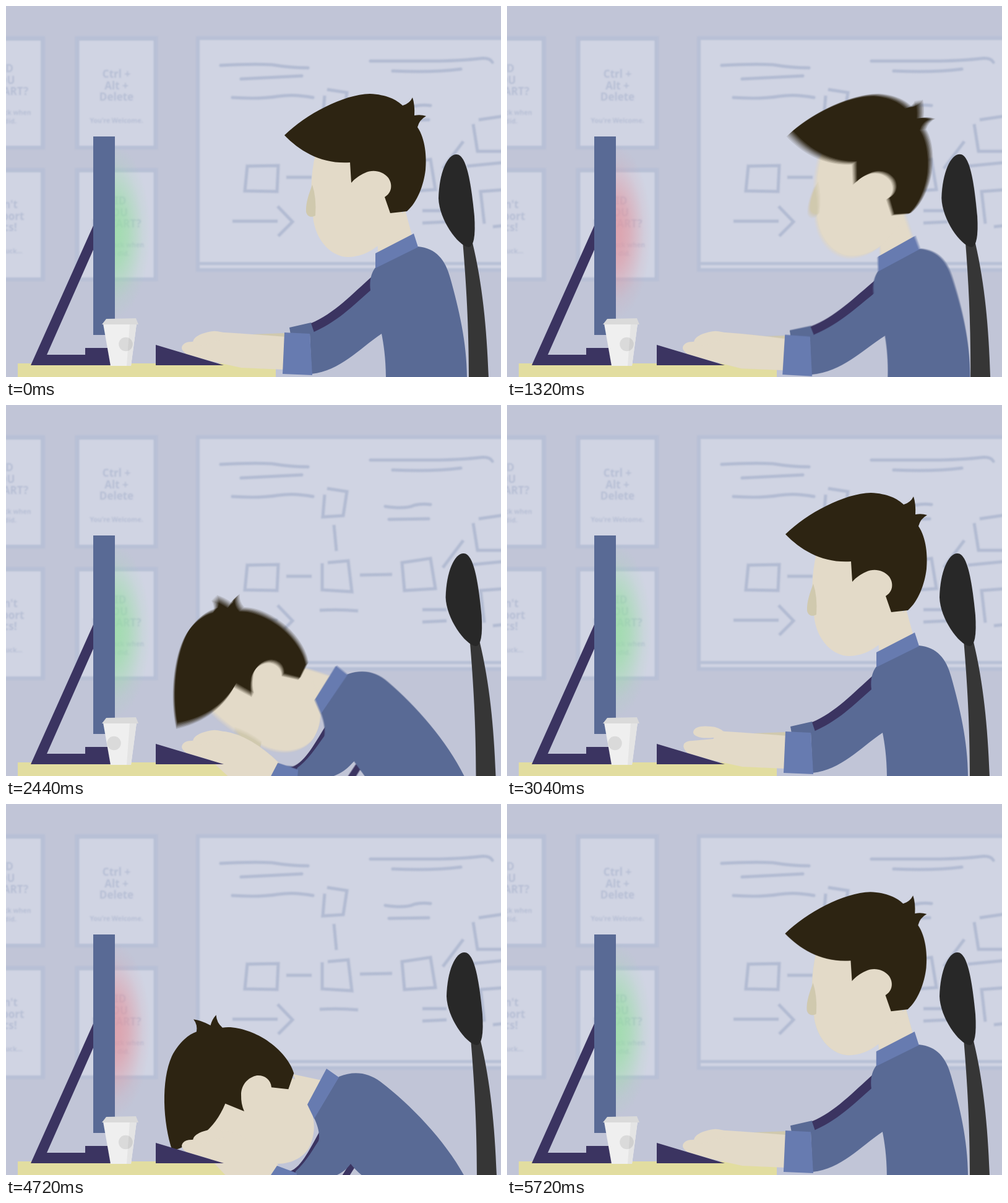
Animation of 800 by 600 pixels, one loop 5760 ms. Source, as an HTML page with a canvas:

```html
<!DOCTYPE html>
<html lang="en">
<head>
<meta charset="utf-8">
<title>Desk slam</title>
<style>
html, body { margin: 0; width: 100%; height: 100%; overflow: hidden; background: #c1c5d7; }
canvas { display: block; }
</style>
</head>
<body>
<canvas id="stage" width="800" height="600"></canvas>
<script>
const LOOP = 5760, HALF = 2880, STEP = 40, SHUTTER = 18, SAMPLES = 8;
const LEAN = 960, SLAM = 1220, HIT = 1470, WAKE = 2250;
const SHIRT = '#596a95', TRIM = '#677bb0', DARK = '#3b3461', SKIN = '#e3dac8', SHADE = '#d0c9ae';

const stage = document.getElementById('stage').getContext('2d');
const layer = () => {
  const c = document.createElement('canvas');
  c.width = 800;
  c.height = 600;
  return c.getContext('2d');
};
const wall = layer(), scene = layer();

const clamp = v => Math.min(1, Math.max(0, v));
const ramp = (t, a, b) => clamp((t - a) / (b - a));
const mix = (a, b, k) => a + (b - a) * k;
const inOut = u => u < .5 ? 4 * u ** 3 : 1 - 4 * (1 - u) ** 3;

function fill(color, path) {
  scene.fillStyle = color;
  scene.fill(new Path2D(path));
}

function drawWall(g) {
  const frame = '#b8c0d6', paper = '#d0d4e3';
  const box = (color, x, y, w, h) => { g.fillStyle = color; g.fillRect(x, y, w, h); };
  box('#c1c5d7', 0, 0, 800, 600);
  g.filter = 'blur(1px)';

  const poster = (x, y, big, bigY, small, smallY) => {
    box(frame, x - 67, y, 134, 183);
    box(paper, x - 60, y + 7, 120, 170);
    g.fillStyle = '#b7bfd5';
    g.textAlign = 'center';
    g.font = '800 17px "Noto Sans", sans-serif';
    big.forEach((s, i) => g.fillText(s, x, bigY + i * 18.6));
    g.font = '800 10.5px "Noto Sans", sans-serif';
    small.forEach((s, i) => g.fillText(s, x, smallY + i * 14));
  };
  const restart = ['DID', 'YOU', 'RESTART?'], back = ['Come back when', 'you did.'];
  poster(-4, 49, restart, 107, back, 176);
  poster(178.5, 49, ['Ctrl +', 'Alt +', 'Delete'], 116, ["You're Welcome."], 189);
  poster(-4, 262, ["Don't", 'support', 'docs!'], 327, ['Good luck...'], 400);
  poster(178.5, 262, restart, 321, back, 390);

  box(frame, 307, 49, 510, 381);
  box(paper, 313, 55, 510, 359);
  box(paper, 313, 419, 510, 5);
  g.strokeStyle = '#b2bbd2';
  g.lineWidth = 5;
  g.lineCap = 'round';
  g.stroke(new Path2D(`M347,96Q400,93 430,95Q460,100 488,100M380,118L478,113
    M366,148Q410,151 440,146Q465,142 496,148M589,89L700,89Q740,88 765,85Q782,83 786,91
    M625,105Q690,108 735,102M613,164Q645,169 660,162Q672,159 686,161M619,185L683,184`));
  g.lineCap = 'butt';
  g.stroke(new Path2D(`M519,135L551,140L545,179L512,181L515,145M530,194L534,236
    M390,259L440,258L438,300L386,299ZM453,277L494,277M520,255L553,252L559,302L511,299L511,256
    M572,275L624,274M640,255L686,248L694,297L644,300ZM739,219L706,263
    M764,184L805,178M755,191L762,235L805,235M745,259L805,253M805,297L767,300L773,352M787,357L805,355
    M673,331L712,331M673,351L712,349M507,332Q540,330 569,333M366,348L439,348M439,324L463,349L440,372`));
  g.filter = 'none';
}

// Time inside one slam; the second one runs slightly late.
const phaseAt = t => (t < HALF ? t : t - 10 + HALF) % HALF;

function poseAt(p) {
  const lean = p < HIT ? inOut(ramp(p, LEAN, SLAM)) : 0;
  const down = p < HIT ? ramp(p, SLAM, HIT) ** 3 : 1 - inOut(ramp(p, WAKE, HALF));
  return { lean, down };
}

// Blends two paths of equal structure: sitting up (with a lean back) and lying on the desk.
function morph(up, lying, { lean, down }) {
  const from = up.match(/\d+/g).map(Number), to = lying.match(/\d+/g).map(Number);
  let i = 0;
  return up.replace(/\d+/g, () => {
    const even = i % 2 === 0, x = from[i], y = from[i + 1];
    const shift = even ? lean * 10 * clamp((x - 495) / 100) * clamp((680 - y) / 200) : 0;
    const v = mix(from[i] + shift, to[i], down);
    i++;
    return v.toFixed(2);
  });
}

function drawGlow(p) {
  const rgb = p >= 880 && p < 2280 ? '224,150,160' : '150,222,162';
  scene.save();
  scene.beginPath();
  scene.rect(176, 200, 100, 330);
  scene.clip();
  scene.translate(172, 365);
  scene.scale(62, 142);
  const g = scene.createRadialGradient(0, 0, 0, 0, 0, 1);
  [.78, .74, .6, .36, .12, 0].forEach((a, i) => g.addColorStop(i / 5, `rgba(${rgb},${a})`));
  scene.fillStyle = g;
  scene.fillRect(-1, -1, 2, 2);
  scene.restore();
}

function drawChair({ lean, down }) {
  scene.save();
  scene.translate(765 + 13 * down, 640);
  scene.rotate(.008 * lean * (1 - down));
  scene.translate(-765, -640);
  fill('#363636', 'M738,380L754,383C770,450 777,520 780,602L748,602C748,520 744,450 738,380Z');
  fill('#282828', 'M728,240C745,240 752,290 757,340Q760,388 748,390C730,388 700,345 699,311C700,270 713,240 728,240Z');
  scene.restore();
}

function drawHead({ lean, down }) {
  const arc = down * (1 - down);
  scene.save();
  scene.translate(mix(558 + 20 * lean, 385, down) - 50 * arc, mix(286 - 11 * lean, 497, down) - 45 * arc);
  scene.rotate(mix(6.5 * lean, -64.5, down) * Math.PI / 180);
  scene.translate(-558, -286);
  fill(SKIN, 'M500,240C492,275 492,305 496,340C500,382 528,406 553,406C580,405 594,393 606,384L640,340L640,240Z');
  fill(SHADE, 'M495,289C490,303 484,318 485,333C487,342 495,342 500,339Q502,310 495,289Z');
  fill('#2d2412', `M450,209C485,175 545,143 588,142C615,143 632,152 641,161Q652,158 657,148
    Q661,160 660,177Q670,175 679,178Q668,184 665,196C678,215 680,245 678,265C675,290 665,317 648,332
    L621,335L612,309C624,302 625,288 618,278C608,266 592,264 580,270C571,274 564,279 558,286L556,253
    C510,256 475,235 450,209Z`);
  scene.restore();
}

function drawHand(pose, p) {
  const raised = p < 840 ? (1 - Math.cos(p / 280 * 2 * Math.PI)) / 2 : 0;
  const tip = 284 + 3 * raised;
  fill(SKIN, morph(
    'M292,563Q280,555 286,548Q290,543 300,543L333,540L345,527Q352,528 354,528Q400,531 452,535L448,588L380,585L330,574Z',
    'M292,563Q280,555 286,548Q290,543 300,543L333,540L345,527Q352,528 354,528Q395,535 440,584L426,606L360,606L330,574Z',
    pose).replace('280.00', (tip - 4).toFixed(2)));
  scene.save();
  scene.translate(348, 533);
  scene.rotate(-(1 - raised) * .36);
  scene.translate(-348, -533);
  fill(SKIN, 'M350,541Q340,538 333,538C315,540 301,536 301,529C302,520 315,518 330,520Q342,521 350,528Z');
  scene.restore();
}

function drawPerson(pose, p) {
  const part = (color, up, lying) => fill(color, morph(up, lying, pose));
  part(SHADE, 'M398,531L450,529L455,537L400,537Z', 'M400,590L440,592L440,602L400,602Z');
  part(SHIRT, 'M458,520L493,512L502,531L460,531Z', 'M440,590L465,594L468,602L440,602Z');
  part(DARK, 'M493,513C530,498 560,465 592,437L592,462C560,490 530,515 499,531Z',
    'M455,595C475,592 490,560 506,531L506,545C500,560 485,590 470,602Z');
  part(DARK, 'M645,570L665,550L672,558L656,590Z', 'M540,606L557,579L564,587L552,606Z');
  part(SKIN, 'M600,380L645,330L660,385L602,410Z', 'M490,500L464,437L520,449L492,500Z');
  drawHead(pose);
  part(SHIRT, `M597,423L666,389C695,392 710,410 718,440C732,490 745,545 745,602L614,602
    C614,570 610,545 607,530C570,555 540,590 494,595L491,530C535,512 560,485 589,460C587,445 590,432 597,423Z`,
    `M498,508L538,441C562,431 585,434 605,449C655,487 710,545 741,602L577,602
    C571,597 563,590 557,582C550,590 540,610 466,612L468,594C482,582 492,565 505,545C508,535 504,520 498,508Z`);
  part(TRIM, 'M597,400L659,368L666,390L597,424Z', 'M487,486L518,428L538,442L498,509Z');
  drawHand(pose, p);
  part(TRIM, 'M450,528L491,530L495,597L447,595Z', 'M438,585L470,597L466,625L420,612Z');
}

function drawCup(t, p) {
  const u = ramp(p, HIT, 1740);
  const turned = ramp(t, HIT, 1830) - ramp(t, HIT + HALF + 10, 1830 + HALF + 10);
  scene.save();
  scene.translate(186, 582 - 14 * Math.sin(u * Math.PI));
  scene.rotate(.08 * Math.sin(u * 2 * Math.PI));
  scene.translate(-186, -582);
  fill('#efefef', 'M157,514L211,514L202,582L169,582Z');
  fill('#e4e4e4', 'M200,514L211,514L202,582L195,582Z');
  scene.fillStyle = 'rgba(0,0,0,.085)';
  scene.beginPath();
  scene.arc(193.5 - 19 * turned, 547, 11.3, 0, 7);
  scene.fill();
  fill('#dadada', 'M155,515L162,506L210,505L214,515Z');
  scene.restore();
}

function drawScene(t) {
  const p = phaseAt(t), pose = poseAt(p);
  const since = p - HIT;
  const shake = since > 0 && since < 350 ? -6 * Math.exp(-since / 90) * Math.cos(since / 26) : 0;
  const shaken = draw => {
    scene.save();
    scene.translate(shake, 0);
    draw();
    scene.restore();
  };
  scene.drawImage(wall.canvas, 0, 0);
  drawGlow(p);
  shaken(() => {
    fill('#e2dda0', 'M19,578H436V602H19Z');
    fill(DARK, 'M142,353L40,581H170V553H128V564H66L142,392Z');
    fill(SHIRT, 'M141,211H176V532H141Z');
  });
  drawChair(pose);
  drawPerson(pose, p);
  shaken(() => fill(DARK, 'M242,548L352,581H242Z'));
  drawCup(t, p);
}

function render(now) {
  const t = Math.floor(now % LOOP / STEP) * STEP, p = phaseAt(t);
  const moving = p > LEAN && p < 1840 || p > WAKE;
  const count = moving ? SAMPLES : 1;
  // Averaging sub-frames gives motion blur.
  for (let i = 0; i < count; i++) {
    const offset = moving ? ((i + .5) / count - .5) * SHUTTER : 0;
    drawScene((t + offset + LOOP) % LOOP);
    stage.globalAlpha = 1 / (i + 1);
    stage.drawImage(scene.canvas, 0, 0);
  }
}

drawWall(wall);
const start = performance.now();
function tick() {
  render(performance.now() - start);
  requestAnimationFrame(tick);
}
tick();
</script>
</body>
</html>
```
